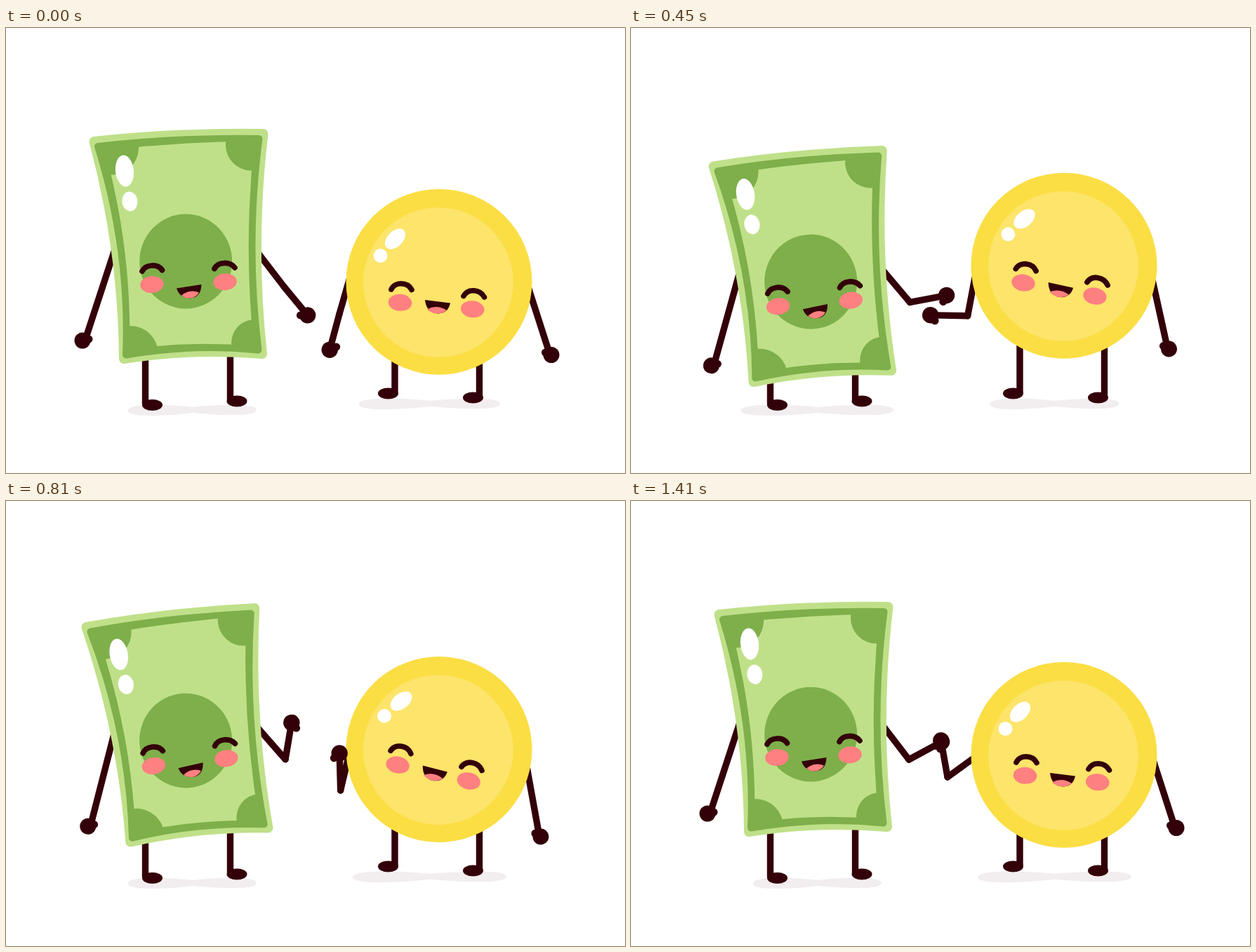
Write an HTML page that moves like this. It is 882 px wide and 635 px high and loops after 1.44 s.

```html
<!DOCTYPE html>
<html lang="en">
<head>
<meta charset="utf-8">
<title>Bill and coin</title>
<style>
  html, body { margin: 0; height: 100%; overflow: hidden; background: #fff; }
  svg { display: block; width: 100vw; height: 100vh; }
  .limb, .eye { fill: none; stroke: #330009; stroke-linecap: round; stroke-linejoin: round; }
  .limb { stroke-width: 9.4; }
  .eye { stroke-width: 7.6; }
  .ink { fill: #330009; }
  .pink { fill: #ff8080; }
  .white { fill: #fff; }
  .shadow { fill: #f2edef; }
  .rim { fill: #bfe089; stroke: #bfe089; stroke-width: 14; stroke-linejoin: round; }
  .dark { fill: #7eaf4a; }
  .band { stroke: #7eaf4a; stroke-width: 10; stroke-linejoin: round; }
  .light { fill: #bfe089; }
</style>
</head>
<body>
<svg viewBox="0 0 882 635">
  <defs>
    <path id="shadow" d="M-91.5 1C-91-10-40-9 0-4C30-7 91-11 91.5 0C91 10 40 8 0 4C-30 8-91 12-91.5 1Z"/>
    <path id="frame" d="M131 169Q246 156 360.500 158Q341 308 359.500 459.500Q265 450 171 466.500Q177 317 131 169Z"/>
    <clipPath id="frameClip"><use href="#frame"/></clipPath>
    <g id="forearm">
      <path class="limb" d="M0 0H46"/>
      <circle class="ink" cx="53" r="11.700"/>
      <circle class="ink" cx="46.500" cy="8" r="5.500"/>
    </g>
  </defs>

  <use id="billShadow" class="shadow" href="#shadow"/>
  <use id="coinShadow" class="shadow" href="#shadow"/>

  <path class="limb" d="M198.500 450V536M319.500 450V530M554 440V520M674.500 440V526"/>
  <g class="ink">
    <ellipse cx="208.500" cy="538" rx="14.500" ry="8"/>
    <ellipse cx="329" cy="532.500" rx="14.500" ry="8"/>
    <ellipse cx="544.500" cy="521.500" rx="14.500" ry="8"/>
    <ellipse cx="665.500" cy="527.500" rx="14.500" ry="8"/>
  </g>

  <g id="bill">
    <path class="limb" d="M158 307L114.500 440M350 309L396 369"/>
    <circle class="ink" cx="109" cy="446" r="11.500"/>
    <circle class="ink" cx="118" cy="444" r="5.500"/>
    <use id="billForearm" href="#forearm"/>
    <path class="rim" d="M125.500 162Q246 149 366.500 151Q348 308 365 465Q266 456.500 168 472Q167 317 125.500 162Z"/>
    <use class="dark band" href="#frame"/>
    <path class="light" d="M141 174.500Q247 162.500 354 161.500Q338 308 353 454Q265 445.500 176 459Q179.500 317 141 174.500Z"/>
    <g class="dark" clip-path="url(#frameClip)">
      <circle cx="151" cy="171.500" r="38"/>
      <circle cx="349.500" cy="167" r="36.500"/>
      <circle cx="177" cy="465" r="40"/>
      <circle cx="354.500" cy="449.500" r="33.500"/>
    </g>
    <ellipse class="dark" cx="256.200" cy="333" rx="66" ry="67.500"/>
    <ellipse class="white" cx="169" cy="204" rx="13" ry="22.500" transform="rotate(-6 169 204)"/>
    <ellipse class="white" cx="176.300" cy="247.500" rx="11" ry="14" transform="rotate(-6 176 247)"/>
    <path class="eye" d="M194 347C199 337 216 336 222.500 345.500M297 343.500C302 333 319 333 326 342"/>
    <ellipse class="pink" cx="208" cy="366" rx="16.800" ry="12" transform="rotate(-5 208 366)"/>
    <ellipse class="pink" cx="312" cy="362.300" rx="16.800" ry="12" transform="rotate(-5 312 362)"/>
    <path class="ink" d="M243 371.500L278.500 366Q278 385 262 385.500Q247 385 243 371.500Z"/>
    <path class="pink" d="M250 381.500Q262 372 275 377.500Q271 384.500 262 385.500Q254 385.500 250 381.500Z"/>
  </g>

  <path id="coinUpperArm" class="limb"/>
  <g id="coin">
    <path class="limb" d="M738 351L773 460"/>
    <circle class="ink" cx="777" cy="466.500" r="11.500"/>
    <circle class="ink" cx="768.500" cy="463" r="5.500"/>
    <circle cx="617" cy="362.200" r="132.500" fill="#fbde44"/>
    <circle cx="616" cy="363" r="106.800" fill="#fde46a"/>
    <ellipse class="white" cx="554.500" cy="301" rx="17.500" ry="11" transform="rotate(-45 554.500 301)"/>
    <circle class="white" cx="533.500" cy="325" r="10"/>
    <path class="eye" d="M549 373C554 362 572 362 578 373.500M652 382.500C658 371.500 675 372.500 681.500 384"/>
    <ellipse class="pink" cx="561.500" cy="391.800" rx="16.800" ry="12" transform="rotate(4 561 392)"/>
    <ellipse class="pink" cx="664.800" cy="401.300" rx="16.800" ry="12" transform="rotate(6 665 401)"/>
    <path class="ink" d="M597 388L633 392.500Q630 407.500 615 407.500Q599 406.500 597 388Z"/>
    <path class="pink" d="M600 401.500Q614 394 628 403Q622 407.500 615 407.500Q606 407 600 401.500Z"/>
  </g>
  <use id="coinForearm" href="#forearm"/>
</svg>
<script>
  const LOOP = 1440, STEP = 30;
  const el = id => document.getElementById(id);
  const set = (id, value, name = 'transform') => el(id).setAttribute(name, value);

  // Cosine-eased value through [time, value] keys, held at both ends.
  function track(t, ...keys) {
    if (t <= keys[0][0]) return keys[0][1];
    for (let i = 1; i < keys.length; i++) {
      const [t0, v0] = keys[i - 1], [t1, v1] = keys[i];
      if (t < t1) return v0 + (v1 - v0) * (1 - Math.cos(Math.PI * (t - t0) / (t1 - t0))) / 2;
    }
    return keys[keys.length - 1][1];
  }

  function draw(t) {
    const tilt = track(t, [0, 0], [750, 1], [1080, 0]);
    const billDrop = track(t, [0, 0], [330, 31], [1080, 0]);
    const coinRise = track(t, [0, 0], [385, 23.5], [1080, 0]);
    set('bill', `translate(0 ${billDrop}) rotate(${-4.1 * tilt} 256 333)`);
    set('coin', `translate(0 ${-coinRise}) rotate(${8.2 * tilt} 617 362.2)`);

    const billWidth = track(t, [0, 91.5], [390, 108.7], [430, 108.7], [825, 91.5]);
    const coinWidth = track(t, [0, 100.5], [390, 92], [430, 92], [815, 109.5]);
    set('billShadow', `translate(265.3 545) scale(${billWidth / 91.5} 1)`);
    set('coinShadow', `translate(603.5 536) scale(${coinWidth / 91.5} 1)`);

    const billAngle = track(t, [0, 50.5], [1000, -88.7], [1080, -88.7], [1260, -28.5]);
    set('billForearm', `translate(396 369) rotate(${billAngle})`);

    const reach = track(t, [985, 0], [1260, 1]);
    const elbowX = track(t, [0, 475], [190, 480], [330, 480], [985, 476], [1260, 451]);
    const elbowY = track(t, [0, 408], [330, 410], [690, 413], [985, 413], [1260, 394]);
    const coinAngle = track(t, [0, 105], [990, 282.5], [1260, 260]);
    set('coinUpperArm', `M${490 + 5 * reach} ${356 + 6 * reach}L${elbowX} ${elbowY}`, 'd');
    set('coinForearm', `translate(${elbowX} ${elbowY}) rotate(${coinAngle}) scale(1 -1)`);
  }

  function tick() {
    draw(Math.floor(performance.now() % LOOP / STEP) * STEP);
    requestAnimationFrame(tick);
  }
  tick();
</script>
</body>
</html>
```
